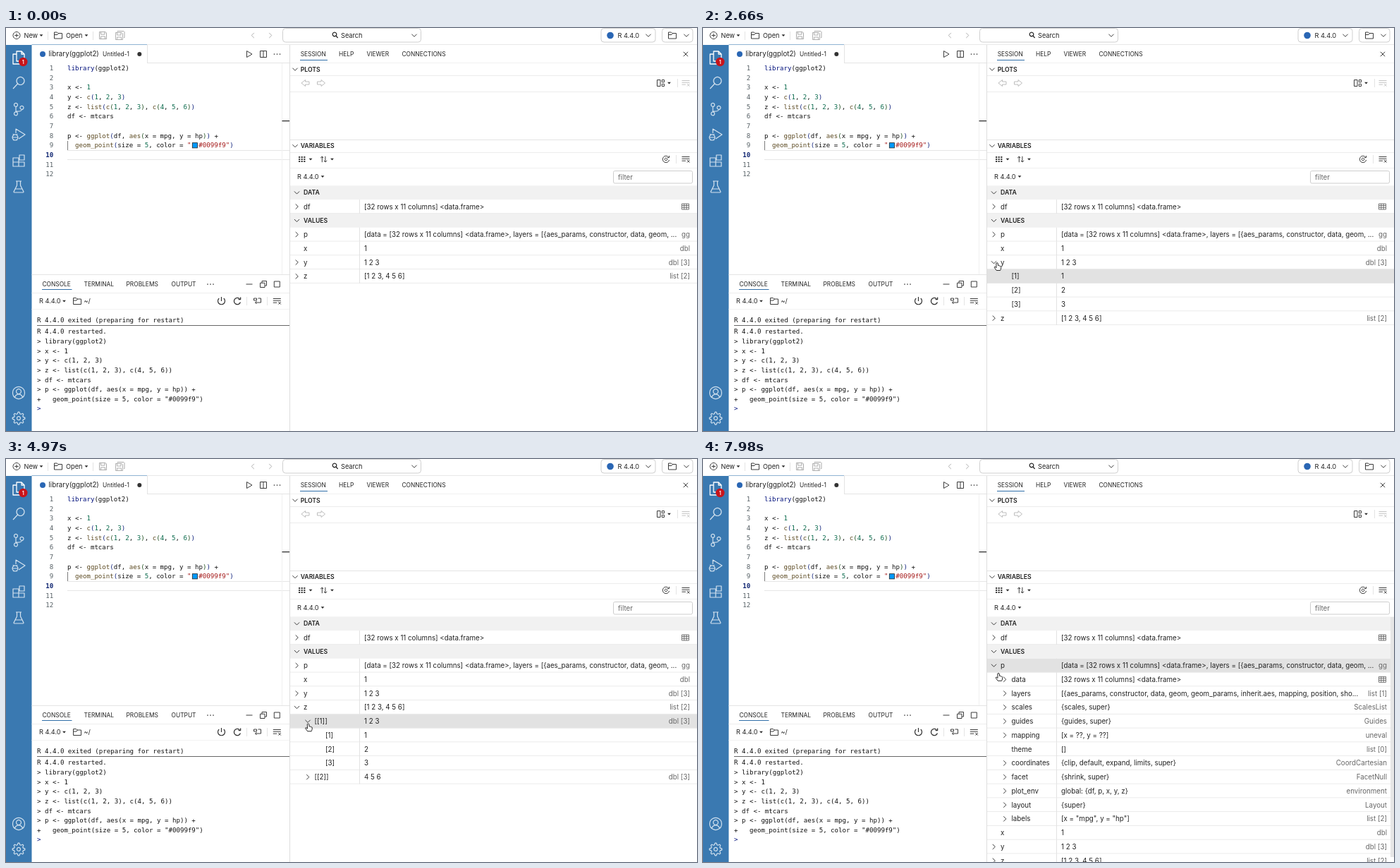
An HTML page that plays this animation: 980x571 px, repeating every 8000 ms.

```html
<!DOCTYPE html>
<html lang="en">
<head>
<meta charset="utf-8">
<title>Variables pane</title>
<style>
html, body { margin: 0; width: 100%; height: 100%; overflow: hidden; background: #fff; }
svg { display: block; width: 980px; height: 571px; }
text { font-family: Inter, "Liberation Sans", sans-serif; font-size: 9.76px; fill: #222; white-space: pre; }
.s { font-size: 8.4px; }
.b { font-size: 8.7px; font-weight: 600; }
.m { font-size: 9.2px; }
.g { fill: #666; }
.e { text-anchor: end; }
.c { font-family: "DejaVu Sans Mono", monospace; font-size: 9.12px; fill: #111; }
.k { fill: #00107c; } .n { fill: #0a6a4c; } .f { fill: #5c4a22; } .q { fill: #a31515; }
.p1 { fill: #14267f; } .p2 { fill: #235223; }
</style>
</head>
<body>
<svg viewBox="0 0 980 571">
  <g id="base"></g>
  <g id="rows"></g>
  <g id="pointer">
    <circle id="ring" r="19.5" fill="none" stroke="#222" stroke-opacity=".7"/>
    <path id="hand" d="M-1.2.6Q0-.8 1.2.6L1.6 4Q2.6 3.4 3.2 4.3Q4.2 3.9 4.6 4.9Q5.8 4.8 5.8 6L5.5 8.5Q5 10 4.6 10.8H-.8L-3.6 7Q-4.2 5.5-2.8 5.6L-1 7Z" fill="#fff" stroke="#111" stroke-width=".9" stroke-linejoin="round"/>
    <path id="arrow" d="M0 0V11L2.5 8.6 4.2 12.4 6 11.6 4.4 8H7.8Z" fill="#111" stroke="#fff" stroke-width=".7"/>
  </g>
</svg>
<script>
const $ = id => document.getElementById(id);
const esc = s => s.replace(/&/g, '&amp;').replace(/</g, '&lt;');
const text = (x, y, s, cls = '') => `<text x="${x}" y="${y}" class="${cls}">${esc(s)}</text>`;
const rect = (x, y, w, h, fill, extra = '') => `<rect x="${x}" y="${y}" width="${w}" height="${h}" fill="${fill}" ${extra}/>`;
const hline = (x1, x2, y, fill = '#e4e4e4', h = 1) => rect(x1, y, x2 - x1, h, fill);
const vline = (x, y1, y2, fill = '#e4e4e4') => rect(x, y1, 1, y2 - y1, fill);
const icon = (x, y, d, color = '#3c3c3c', w = 1, extra = '') =>
  `<path transform="translate(${x} ${y})" d="${d}" fill="none" stroke="${color}" stroke-width="${w}" stroke-linejoin="round" ${extra}/>`;
const dot = (x, y, r, fill) => `<circle cx="${x}" cy="${y}" r="${r}" fill="${fill}"/>`;
const caret = (x, y) => `<path d="M${x - 2.4} ${y - 1.2}h4.8l-2.4 2.8z" fill="#2b2b2b"/>`;
const dots = (x, y) => [-4, 0, 4].map(d => dot(x + d, y, .85, '#3c3c3c')).join('');
const box = (x, y, w, h) => rect(x, y, w, h, '#fff', 'rx="4" stroke="#cfcfcf"');

const DOWN = 'M-3.6-1.8L0 1.8 3.6-1.8', RIGHT = 'M-1.8-3.6L1.8 0-1.8 3.6', LEFT = 'M1.8-3.6L-1.8 0 1.8 3.6';
const FOLDER = 'M-5.5 4.5V-4.5H-1.5L0-3H5.5V4.5ZM-5.5-1H-1L.5-3';
const CLEAR = 'M-5.5-3.5H5.5M-5.5-.7H5.5M-5.5 2.2H0M2 1L5.5 4.5M5.5 1L2 4.5';
const GRID = 'M-5-4H5V4H-5ZM-5-1.6H5M-5 1.2H5M-1.7-4V4M1.7-4V4';
const SAVE = 'M-5-5H3.5L5-3.5V5H-5ZM-3-5V-1.5H2.5V-5M-3 5V1.5H3V5';

// Each piece is "class|text"; a piece without a class stays plain.
const code = (x, y, ...parts) => `<text x="${x}" y="${y}" class="c">` + parts.map(p => {
  const [cls, s] = p.includes('|') ? p.split('|') : ['', p];
  return `<tspan class="${cls}">${esc(s)}</tspan>`;
}).join('') + '</text>';

function topBar() {
  let o = icon(15, 10.5, 'M5 0A5 5 0 1 1 5-.01M-2.7 0H2.7M0-2.7V2.7') + text(25.5, 14, 'New', 'm') + caret(50, 10.5);
  o += vline(59, 5, 17) + icon(74, 10.5, FOLDER) + text(85, 14, 'Open', 'm') + caret(114, 10.5) + vline(123, 5, 17);
  o += icon(137.5, 10.5, SAVE, '#a9a9a9') + icon(160.5, 11.5, SAVE, '#a9a9a9', .9) + icon(163, 9.5, 'M-5-4V-5H4L5-4V4H4', '#a9a9a9');
  o += icon(350, 10.5, LEFT, '#b0b0b0') + icon(375, 10.5, RIGHT, '#b0b0b0');
  o += box(392.5, .5, 196, 19.5) + icon(466, 10, 'M2.8-1A2.8 2.8 0 1 1 2.8-1.1M1.9 1L4.6 4', '#2b2b2b', 1.3);
  o += text(475, 13.7, 'Search', 'm') + icon(579, 10.5, DOWN);
  o += box(844, .5, 77, 19.5) + dot(857, 10.5, 4.8, '#2a66b4') + text(867.5, 13.8, 'R 4.4.0', 'm') + icon(911, 10.5, DOWN);
  return o + box(930.5, .5, 43.5, 19.5) + icon(945, 10.5, FOLDER) + icon(965, 10.5, DOWN);
}

function activityBar() {
  const side = (y, d) => icon(18, y, d, '#d3e2ef', 1.2);
  let o = rect(0, 24, 36.5, 547, '#3a79b1');
  o += icon(18, 42, 'M-3-9H4L8-5V5H-3ZM4-9V-5H8M-3-5H-8V9H3V5', '#fff', 1.3);
  o += dot(24.3, 48, 6.2, '#c8141b') + '<text x="24.3" y="50.7" text-anchor="middle" style="font-size:7.2px;fill:#fff;font-weight:600">1</text>';
  o += side(78, 'M8-3A5.5 5.5 0 1 1 8-3.1M-1.5 1L-8 8');
  o += side(115, 'M-1.5-6A2.5 2.5 0 1 1-1.5-6.1M-4-3.5V4M-1.5 6.5A2.5 2.5 0 1 1-1.5 6.4M7-2A2.5 2.5 0 1 1 7-2.1M4.5.5Q4 3.5-3.5 3');
  o += side(151, 'M-4-2V-8L9 0 0 6M-1 4A4 4 0 1 1-1 3.9M-9 4H-1M-8-1L-7 1M-2-1L-3 1M-8 8L-7 7M-2 8L-3 7');
  o += side(188, 'M-8-4H0V8H-8ZM-8 2H8V8H0M0 2H8M1-8H8V-1H1Z');
  o += side(225, 'M-4-8H4M-2.5-8V-2L-7 7Q-7 8-6 8H6Q7 8 7 7L2.5-2V-8M-4.5 3H4.5');
  o += side(517, 'M8.5 0A8.5 8.5 0 1 1 8.5-.1M3.5-2A3.5 3.5 0 1 1 3.5-2.1M-5.5 6Q-4 1.8 0 1.8T5.5 6');
  let gear = '';
  for (let i = 0; i < 32; i++) {
    const a = (i - .5) * Math.PI / 16, r = i % 4 < 2 ? 8.8 : 6.6;
    gear += (i ? 'L' : 'M') + (r * Math.cos(a)).toFixed(1) + ' ' + (r * Math.sin(a)).toFixed(1);
  }
  return o + side(553, gear + 'ZM2.5 0A2.5 2.5 0 1 1 2.5-.1');
}

function editor() {
  const line = i => +(60 + 13.66 * (i - 1)).toFixed(2);
  const row = (i, ...parts) => code(87, line(i), ...parts);
  let o = hline(36.5, 200, 23, '#8fb3d2') + hline(200, 402, 23, '#e8e8e8') + vline(200, 24, 49) + hline(200, 402, 49);
  o += dot(52, 37, 4, '#2a66b4') + text(60.5, 40.4, 'library(ggplot2)') + text(137, 40.2, 'Untitled-1', 's') + dot(189.3, 37, 3, '#333');
  o += icon(345, 37, 'M-3.5-4.5L4 0-3.5 4.5Z') + icon(365, 37, 'M-4.5-4.5H4.5V4.5H-4.5ZM0-4.5V4.5') + dots(384.5, 37);
  o += hline(87, 402, 173, '#e6e6e6') + hline(87, 402, 186, '#e6e6e6') + vline(87, 160, 173, '#7c7c7c');
  for (let i = 1; i <= 12; i++)
    o += `<text x="67.3" y="${line(i)}" class="c e" style="${i == 10 ? 'fill:#0b216f;font-weight:700' : 'fill:#555f64'}">${i}</text>`;
  const nums = (a, b, c, p) => [`${p}|(`, `n|${a}`, ', ', `n|${b}`, ', ', `n|${c}`, `${p}|)`];
  o += row(1, 'k|library', '(ggplot2)');
  o += row(3, 'x <- ', 'n|1');
  o += row(4, 'y <- ', 'f|c', ...nums(1, 2, 3, 'p1'));
  o += row(5, 'z <- ', 'f|list', 'p1|(', 'f|c', ...nums(1, 2, 3, 'p2'), ', ', 'f|c', ...nums(4, 5, 6, 'p2'), 'p1|)');
  o += row(6, 'df <- mtcars');
  o += row(8, 'p <- ', 'f|ggplot', 'p1|(', 'df, ', 'f|aes', 'p2|(', 'x = mpg, y = hp', 'p2|)', 'p1|)', ' +');
  o += row(9, '  ', 'f|geom_point', 'p1|(', 'size = ', 'n|5', ', color = ', 'q|"');
  o += rect(264.3, 162.7, 7.2, 7.2, '#0099f9', 'stroke="#222" stroke-width=".8"');
  o += code(273.3, line(9), 'q|#0099f9"', 'p1|)');
  return o + vline(391, 50, 349, '#f0f0f0') + hline(391.5, 402, 131, '#333', 1.3);
}

function consolePane() {
  let o = hline(36.5, 402, 349) + hline(36.5, 402, 375, '#ededed') + hline(36.5, 402, 398, '#f3f3f3');
  [[51.5, 'CONSOLE'], [110.5, 'TERMINAL'], [170.5, 'PROBLEMS'], [234.5, 'OUTPUT']].forEach(([x, s]) => o += text(x, 366, s, 's'));
  o += hline(51, 93.5, 370, '#2f6ea8') + dots(290, 363);
  o += icon(345, 363, 'M-4.5 0H4.5') + icon(365, 363, 'M-4.5-1.8H2V4.5H-4.5ZM-2-1.8V-4.5H4.5V2H2') + icon(384.3, 363, 'M-4-4H4V4H-4Z');
  o += text(47, 390.3, 'R 4.4.0', 'm') + caret(82.5, 387) + icon(101, 387, FOLDER) + text(110.5, 390.3, '~/', 'm');
  o += icon(305.5, 387, 'M-3.3-4A5 5 0 1 0 3.3-4M0-6V0', '#333', 1.2) + icon(328, 387, 'M4.4 1.5A4.6 4.6 0 1 1 3.2-3.3M4.6-5.4V-2.4H1.6', '#333', 1.3);
  o += vline(341, 381, 393) + icon(356.5, 387, 'M-5-1V-4H-1V-1ZM1-4H5V2H-3M-1 0L-3 2-1 4') + vline(370, 381, 393) + icon(384.3, 387, CLEAR);
  o += text(44, 417, 'R 4.4.0 exited (preparing for restart)', 'c') + hline(44, 402, 421, '#666');
  ['R 4.4.0 restarted.', '> library(ggplot2)', '> x <- 1', '> y <- c(1, 2, 3)', '> z <- list(c(1, 2, 3), c(4, 5, 6))', '> df <- mtcars',
   '> p <- ggplot(df, aes(x = mpg, y = hp)) +', '+   geom_point(size = 5, color = "#0099f9")', '>']
    .forEach((s, i) => o += text(44, +(433.2 + 13.66 * i).toFixed(2), s, i == 8 ? 'c k' : 'c'));
  return o;
}

function sessionPane() {
  let o = vline(402, 24, 571, '#dedede') + hline(402, 980, 23, '#e8e8e8');
  [[417.7, 'SESSION'], [472, 'HELP'], [511.5, 'VIEWER'], [561.5, 'CONNECTIONS']].forEach(([x, s]) => o += text(x, 40, s, 's'));
  o += hline(417, 456, 45, '#2f6ea8') + icon(964, 37, 'M-3.2-3.2L3.2 3.2M3.2-3.2L-3.2 3.2');
  o += hline(403, 980, 49, '#f1f1f1') + icon(410, 58.5, DOWN) + text(417.7, 61.8, 'PLOTS', 'b') + hline(403, 980, 67, '#ececec');
  o += icon(424.5, 78, 'M0-4.5L-5.5 0 0 4.5V2H5.5V-2H0Z', '#bdbdbd') + icon(447, 78, 'M0-4.5L5.5 0 0 4.5V2H-5.5V-2H0Z', '#bdbdbd');
  o += icon(928.5, 78, 'M-5-4.5H-.5V4.5H-5ZM1.8-4.5H5V-1.3H1.8ZM1.8 1.3H5V4.5H1.8Z') + caret(940.5, 78);
  o += vline(952, 72, 84) + icon(964, 78, CLEAR, '#c4c4c4') + hline(403, 980, 90, '#ececec');
  o += hline(403, 980, 158) + icon(410, 167, DOWN) + text(417.7, 170.2, 'VARIABLES', 'b') + hline(403, 980, 176, '#ececec');
  o += icon(420, 186, 'M-5-3H5M-5 0H5M-5 3H5', '#3c3c3c', 2, 'stroke-dasharray="2.2 1.4"') + caret(432, 186);
  o += icon(450.5, 186, 'M-2.2 4.2V-4L-4.4-1.8M-2.2-4L-.4-1.8M2.4-4.2V4L.4 1.8M2.4 4L4.6 1.8') + caret(462.5, 186);
  o += icon(936, 186, 'M4.6 1A4.7 4.7 0 1 1 3.4-3.3M4.6-5V-2.4H2M1.8 0A1.8 1.8 0 1 1 1.8-.1') + vline(950, 180, 192) + icon(964, 186, CLEAR);
  o += hline(403, 980, 198, '#f0f0f0') + text(413, 214, 'R 4.4.0', 'm') + caret(449, 210.5);
  o += rect(861.5, 202.5, 112, 17.5, '#fff', 'rx="2" stroke="#cecece"') + text(868, 214.7, 'filter', 'g');
  return o;
}
$('base').innerHTML = topBar() + activityBar() + editor() + consolePane() + sessionPane();

// Variable tree
const head = name => ({ name, head: true });
const row = (name, value, type, depth = 0, chevron = false, open = false) => ({ name, value, type, depth, chevron, open });
const items = (depth, n) => Array.from({ length: n }, (_, i) => row(`[${i + 1}]`, `${i + 1}`, '', depth));
const plotParts = [
  ['data', '[32 rows x 11 columns] <data.frame>', 'table'],
  ['layers', '[{aes_params, constructor, data, geom, geom_params, inherit.aes, mapping, position, sho...', 'list [1]'],
  ['scales', '{scales, super}', 'ScalesList'],
  ['guides', '{guides, super}', 'Guides'],
  ['mapping', '[x = ??, y = ??]', 'uneval'],
  ['theme', '[]', 'list [0]'],
  ['coordinates', '{clip, default, expand, limits, super}', 'CoordCartesian'],
  ['facet', '{shrink, super}', 'FacetNull'],
  ['plot_env', 'global: {df, p, x, y, z}', 'environment'],
  ['layout', '{super}', 'Layout'],
  ['labels', '[x = "mpg", y = "hp"]', 'list [2]']
].map(([n, v, t]) => row(n, v, t, 1, n != 'theme'));

function visibleRows(t) {
  const y = t >= 1750 && t < 3080, z = t >= 3850 && t < 6160, z1 = z && t >= 4550, p = t >= 7280;
  return [
    head('DATA'), row('df', '[32 rows x 11 columns] <data.frame>', 'table', 0, true), head('VALUES'),
    row('p', '[data = [32 rows x 11 columns] <data.frame>, layers = [{aes_params, constructor, data, geom, ...', 'gg', 0, true, p),
    ...(p ? plotParts : []),
    row('x', '1', 'dbl'),
    row('y', '1 2 3', 'dbl [3]', 0, true, y), ...(y ? items(1, 3) : []),
    row('z', '[1 2 3, 4 5 6]', 'list [2]', 0, true, z),
    ...(z ? [row('[[1]]', '1 2 3', 'dbl [3]', 1, true, z1), ...(z1 ? items(2, 3) : []), row('[[2]]', '4 5 6', 'dbl [3]', 1, true)] : [])
  ];
}

const TOP = 223.4, PITCH = 19.76;
function drawRows(rows, hover) {
  let o = '';
  rows.forEach((r, i) => {
    const at = f => +(TOP + PITCH * (i + f)).toFixed(2);
    const top = at(0), mid = at(.5), bottom = at(1), base = +(mid + 3.5).toFixed(2);
    if (r.head) {
      o += rect(403, top, 577, PITCH, '#f1f1f1') + icon(412.5, mid, DOWN) + text(422, base - .3, r.name, 'b');
      return;
    }
    if (i == hover) o += rect(403, top, 577, PITCH, '#e2e2e2');
    o += hline(403, 980, bottom - .8, '#e6e6e6', .8) + vline(501, top, bottom, '#e2e2e2');
    const x = 422 + 15.5 * r.depth;
    if (r.chevron) o += icon(x - 9.5, mid, r.open ? DOWN : RIGHT);
    o += text(x, base, r.name) + text(508, base, r.value);
    o += r.type == 'table' ? icon(963.5, mid, GRID, '#555', .8) : text(970, base, r.type, 'g e');
  });
  if (rows.length > 16) o += rect(975, 224, 5, 340, '#e6e6e6');
  return o;
}

// Pointer path: time, x, y.
const path = [
  [70, 461, 487], [420, 452, 451], [490, 452, 451], [910, 431, 385], [1330, 413.5, 337.2], [1400, 413.5, 336.5],
  [2030, 413.5, 336.5], [2170, 424, 350], [2380, 424.5, 372], [2520, 421, 364], [2730, 415, 317], [2870, 413.5, 336.5],
  [3230, 413.5, 336.5], [3360, 413.5, 346], [3570, 414.5, 347.5], [3990, 414.5, 347.5], [4200, 428, 374.5],
  [4900, 428, 374.5], [4970, 428.5, 375], [5110, 426, 387], [5200, 426, 387], [5390, 421, 366], [5530, 418, 357], [6020, 414, 350],
  [6370, 414, 350], [6650, 415, 314], [6860, 414.5, 300], [7070, 414, 296.5], [7700, 414, 296.5], [7980, 419, 303.5]
];
const clicks = [[1610, 1820], [2940, 3150], [3710, 3920], [4410, 4620], [6090, 6230], [7140, 7350]];

function pointerAt(t) {
  const i = path.findIndex(k => k[0] > t);
  if (i < 1) return (i ? path[path.length - 1] : path[0]).slice(1);
  const [t0, x0, y0] = path[i - 1], [t1, x1, y1] = path[i], p = (t - t0) / (t1 - t0);
  return [x0 + (x1 - x0) * p, y0 + (y1 - y0) * p];
}

// The hovered row trails the pointer slightly.
const LOOP = 8000, STEP = 70, LAG = 60;
const rowAt = y => Math.floor((y - TOP) / PITCH);
const show = (id, on) => $(id).setAttribute('visibility', on ? 'visible' : 'hidden');
let drawn = '';

function render(ms) {
  const t = Math.floor((ms % LOOP) / STEP) * STEP;
  const rows = visibleRows(t), [x, y] = pointerAt(t), active = t >= 70;
  const hover = active ? rowAt(pointerAt(t - LAG)[1]) : -1;
  const key = rows.map(r => r.name + r.open) + hover;
  if (key != drawn) {
    $('rows').innerHTML = drawRows(rows, hover);
    drawn = key;
  }
  const over = rowAt(y) < rows.length;
  $('pointer').setAttribute('transform', `translate(${x.toFixed(2)} ${y.toFixed(2)})`);
  show('hand', active && over);
  show('arrow', active && !over);
  show('ring', clicks.some(([a, b]) => t >= a && t < b));
}

const start = performance.now();
function tick() {
  render(performance.now() - start);
  requestAnimationFrame(tick);
}
tick();
</script>
</body>
</html>
```
